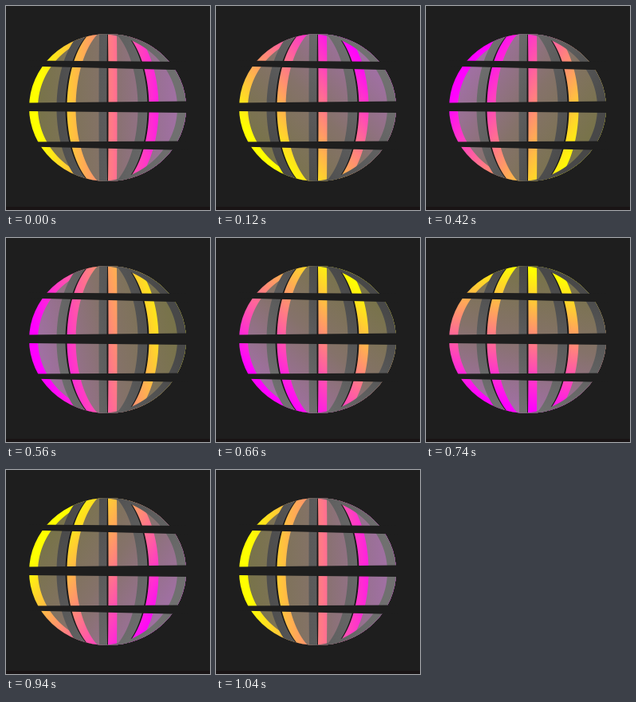
An HTML page with a canvas for the animation above (1060 ms loop, 256x256 px).

```html
<!DOCTYPE html>
<html>
<head>
<meta charset="utf-8">
<style>
html, body { margin: 0; width: 100%; height: 100%; overflow: hidden; background: #1e1e1e; }
canvas { display: block; }
</style>
</head>
<body>
<canvas id="stage" width="256" height="256"></canvas>
<script>
const ctx = document.getElementById('stage').getContext('2d');
const BG = '#1e1e1e', GAP = '#1a1a1a';
const CX = 127.5, CY = 127.5, RX = 98.5, RY = 92.5, REACH = 85;
const STEP = 20, LOOP = 1060, TURN = 1040;

const COLORS = {
  bright: ['#ffff00', '#ff8080', '#ff00ff'],
  face: ['#78734a', '#85726a', '#a070a2'],
  side: ['#484848', '#5c5c5c', '#707070']
};

// Each edge: bulge at the equator, pole radius, sideways shift, paint to its right
const EDGES = [
  [-RX, RY, -2, 'bright'], [-RX, RY, 11, 'face'], [-53, 104, -11, 'side'], [-53, 104, 0, 'gap'],
  [-51, 104, 0, 'bright'], [-51, 104, 11, 'face'], [-1, 104, -10, 'side'], [-1, 104, 0, 'gap'],
  [1, 104, 0, 'bright'], [1, 104, 11, 'face'], [50, 104, -12, 'side'], [50, 104, 0, 'gap'],
  [52, 104, 0, 'bright'], [52, 104, 12, 'face'], [RX, RY, -11, 'side']
];

// Horizontal gaps: top-left, top-right, bottom-right, bottom-left heights
const GAPS = [[68.5, 70, 80.5, 75.5], [121.5, 119.5, 134, 132], [170.5, 169.5, 181, 176.5]];

function gradient(stops, angle) {
  const dx = REACH * Math.cos(angle), dy = -REACH * Math.sin(angle);
  const g = ctx.createLinearGradient(CX - dx, CY - dy, CX + dx, CY + dy);
  stops.forEach((color, i) => g.addColorStop(i / 2, color));
  return g;
}

function fillRightOf(bulge, radius, shift) {
  ctx.beginPath();
  ctx.moveTo(256, 30);
  for (let y = 30; y <= 225; y++) {
    const k = Math.sqrt(Math.max(0, 1 - ((y - CY) / radius) ** 2));
    ctx.lineTo(CX + bulge * k + shift, y);
  }
  ctx.lineTo(256, 225);
  ctx.fill();
}

function draw(time) {
  const t = Math.floor(time / STEP) * STEP % LOOP;
  const angle = 2 * Math.PI * t / TURN;
  const paint = { gap: GAP };
  for (const name in COLORS) paint[name] = gradient(COLORS[name], angle);

  ctx.fillStyle = BG;
  ctx.fillRect(0, 0, 256, 256);
  ctx.fillStyle = '#191415';
  ctx.fillRect(0, 252, 256, 4);

  ctx.save();
  ctx.beginPath();
  ctx.ellipse(CX, CY, RX, RY, 0, 0, 2 * Math.PI);
  ctx.clip();
  for (const [bulge, radius, shift, name] of EDGES) {
    ctx.fillStyle = paint[name];
    fillRightOf(bulge, radius, shift);
  }
  ctx.restore();

  ctx.fillStyle = BG;
  for (const [a, b, c, d] of GAPS) {
    ctx.beginPath();
    ctx.moveTo(28, a);
    ctx.lineTo(228, b);
    ctx.lineTo(228, c);
    ctx.lineTo(28, d);
    ctx.fill();
  }
}

const start = performance.now();
function tick() {
  draw(performance.now() - start);
  requestAnimationFrame(tick);
}
tick();
</script>
</body>
</html>
```
